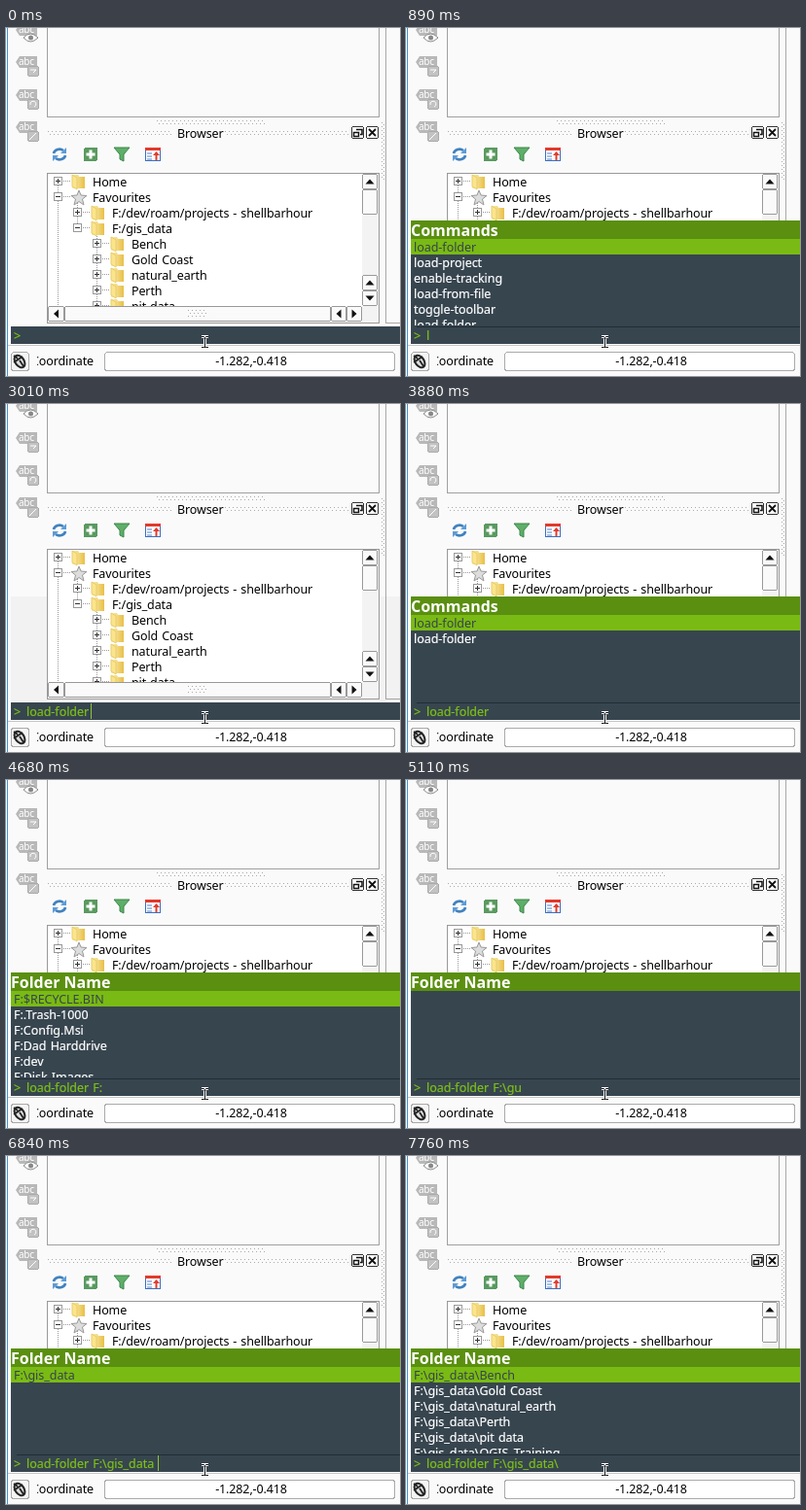
An HTML page for the animation above (8 s loop, 405x358 px).

```html
<!DOCTYPE html>
<html lang="en">
<head>
<meta charset="utf-8">
<title>Command bar</title>
<style>
  html, body { margin: 0; width: 100%; height: 100%; overflow: hidden; background: #fafafa; }
  svg { display: block; width: 405px; height: 358px; }
  text {
    font: 12.5px "Noto Sans", "Open Sans", sans-serif;
    letter-spacing: -.12px; word-spacing: .9px; white-space: pre; fill: #000;
  }
  rect { shape-rendering: crispEdges; }
  .title { font: bold 16px "Noto Sans", "Open Sans", sans-serif; letter-spacing: 0; word-spacing: 0; fill: #fff; }
  .row, .prompt { letter-spacing: -.03px; stroke-width: .2; }
  .row { fill: #fff; stroke: #fff; }
  .row:first-child { fill: #35444e; stroke: none; }
  .prompt { fill: #7dc018; stroke: #7dc018; }
  .tag { font-size: 10px; letter-spacing: -.3px; fill: #fff; }
</style>
</head>
<body>
<svg id="stage" viewBox="0 0 405 358">
  <defs>
    <linearGradient id="gold" x2="1"><stop stop-color="#fdf0b4"/><stop offset="1" stop-color="#e8bf48"/></linearGradient>
    <clipPath id="treeClip"><rect x="43" y="150" width="323" height="136"/></clipPath>
    <clipPath id="listClip"><rect x="5" y="198" width="400" height="108"/></clipPath>
    <clipPath id="labelClip"><rect x="32" y="332" width="66" height="24"/></clipPath>
  </defs>
  <g id="window"></g>
  <rect id="shade" x="5" y="198" width="400" height="109" fill-opacity=".032"/>
  <g id="icons">
    <g fill="none" stroke="#3f82c0" stroke-width="2.6">
      <path d="M49 129a6 5 0 0 1 10-3M61 131a6 5 0 0 1-10 3"/>
    </g>
    <path d="M62 123v6h-6zM48 137v-6h6z" fill="#5b9bd6"/>
    <rect x="80" y="123" width="14" height="14" rx="2" fill="#5a9a60"/>
    <path d="M87 125.500v9M82.500 130h9" stroke="#fff" stroke-width="3"/>
    <path d="M111 123h16l-6 7v7l-4-2v-5z" fill="#5fae6a" stroke="#3a8749"/>
    <rect x="143.5" y="123.5" width="15" height="13" fill="#fff" stroke="#3c6fc0"/>
    <rect x="143" y="123" width="16" height="3" fill="#e23a2c"/>
    <path d="M145 129h5M145 132h5M145 135h5" stroke="#4a80cf"/>
    <path d="M154.500 136v-6" stroke="#e23a2c" stroke-width="2"/>
    <path d="M151 131l3.500-4 3.500 4z" fill="#e23a2c"/>
  </g>
  <g id="tree" clip-path="url(#treeClip)"></g>
  <g id="bars"></g>
  <rect x="5" y="307" width="400" height="18" fill="#37454f"/>
  <g id="popup">
    <rect x="5" y="198" width="400" height="110" fill="#37454f"/>
    <rect x="5" y="198" width="400" height="19" fill="#5a8f10"/>
    <rect id="highlight" x="5" y="217" width="400" height="16" fill="#7aba14"/>
    <rect x="11" y="307" width="394" height="1" fill="#222d34"/>
    <text id="title" class="title" x="5" y="214"></text>
    <g id="list" clip-path="url(#listClip)"></g>
  </g>
  <text class="prompt" x="8" y="321">&gt;</text>
  <text id="typed" class="prompt" x="21" y="321"></text>
  <rect id="caret" y="308" width="1" height="16" fill="#8fc63a"/>
  <g fill="none">
    <path d="M201 317.500h2.500l1 1 1-1h2.500M204.500 318v11M201 328.500h2.500l1-1 1 1h2.500" stroke="#fff" stroke-width="3"/>
    <path d="M201 317.500h2.500l1 1 1-1h2.500M204.500 318v11M201 328.500h2.500l1-1 1 1h2.500" stroke="#111"/>
  </g>
</svg>
<script>
const $ = id => document.getElementById(id);

function add(parent, name, attrs, content = "") {
  const el = document.createElementNS("http://www.w3.org/2000/svg", name);
  for (const key in attrs) el.setAttribute(key, attrs[key]);
  el.textContent = content;
  return parent.appendChild(el);
}
const box = (g, x, y, width, height, fill) => add(g, "rect", { x, y, width, height, fill });
const frame = (g, x, y, w, h, fill, stroke, rx = 0) =>
  add(g, "rect", { x: x + .5, y: y + .5, width: w - 1, height: h - 1, fill, stroke, rx });
const path = (g, d, fill, stroke = "none", width = 1) =>
  add(g, "path", { d, fill, stroke, "stroke-width": width });
const label = (g, x, y, content, attrs = {}) => add(g, "text", { x, y, ...attrs }, content);

function dots(g, x, y, cols, rows) {
  for (let r = 0; r < rows; r++)
    for (let c = 0; c < cols; c++) box(g, x + c * 4 + (r % 2) * 2, y + r * 3, 1, 1, "#aaa");
}

function drawWindow(g) {
  box(g, 0, 0, 405, 358, "#fafafa");
  box(g, 1, 0, 1, 358, "#3d93dc");
  frame(g, 42, -2, 342, 94, "#fafafa", "#a0a0a0");
  frame(g, 390, -2, 20, 306, "#fafafa", "#a8a8a8");
  dots(g, 155, 95, 28, 2);
  dots(g, 43, 106, 32, 2);
  dots(g, 225, 106, 32, 2);
  for (let y = 97; y < 156; y += 4) {
    box(g, 386, y, 1, 1, "#aaa");
    box(g, 388, y + 2, 1, 1, "#aaa");
  }
  label(g, 176, 113, "Browser");
  frame(g, 355, 101, 13, 13, "#fff", "#333", 2);
  path(g, "M360 104.500h6v5h-2M357.500 107.500h5v4h-5z", "none", "#111", 1.5);
  frame(g, 370, 101, 13, 13, "#fff", "#333", 2);
  path(g, "M373 104l7 7M380 104l-7 7", "none", "#111", 1.8);

  const marks = [[25, 8, "h6l-3 3"], [25, 10, "a3 3 0 1 1 4 2"], [24, 13, "l7-7"]];
  [2, 35, 69, 102].forEach((y, i) => {
    path(g, `M10 ${y}l4-6h18v12h-18z`, "#b8b8b8");
    label(g, 13, y + 3, "abc", { class: "tag" });
    if (i === 0) {
      path(g, `M18 ${y + 8}q7-8 15 0q-8 8-15 0z`, "#fff", "#888");
      add(g, "circle", { cx: 25.5, cy: y + 8, r: 2.5, fill: "#888" });
    } else {
      const [mx, my, mark] = marks[i - 1];
      frame(g, 22, y + 4, 12, 11, "#c2c2c2", "#aaa", 2);
      path(g, `M${mx} ${y + my}${mark}`, "none", "#fff");
    }
  });

  box(g, 2, 326, 403, 1, "#c8c8c8");
  frame(g, 5, 333, 19, 20, "#f4f4f4", "#aaa", 3);
  add(g, "ellipse", { cx: 14, cy: 343, rx: 4.5, ry: 7, fill: "#ddd", stroke: "#222", "stroke-width": 2, transform: "rotate(-35 14 343)" });
  path(g, "M8 344l9-6M14 342l4 6M8 337l4 3", "none", "#222", 1.8);
  label(g, 26, 347, "Coordinate", { "clip-path": "url(#labelClip)" });
  frame(g, 101, 333, 299, 20, "#fff", "#aaa", 3);
  label(g, 252, 347, "-1.282,-0.418", { "text-anchor": "middle" });
}

function drawTree(g) {
  box(g, 43, 150, 323, 136, "#fff");
  const line = d => add(g, "path", { d, fill: "none", stroke: "#999", "stroke-dasharray": "1 1" });
  line("M53.500 158v128M73.500 180v26M93.500 212v80");
  const rows = [
    [0, "+", "Home"], [0, "-", "Favourites"],
    [1, "+", "F:/dev/roam/projects - shellbarhour"], [1, "-", "F:/gis_data"],
    [2, "+", "Bench"], [2, "+", "Gold Coast"], [2, "+", "natural_earth"], [2, "+", "Perth"], [2, "+", "pit data"]
  ];
  rows.forEach(([level, sign, name], i) => {
    const x = 53 + level * 20, y = 158 + i * 16, ix = 68 + level * 20;
    line(`M${x + 4} ${y - .5}h10`);
    frame(g, x - 4, y - 5, 9, 9, "#fff", "#999");
    box(g, x - 2, y - 1, 5, 1, "#333");
    if (sign === "+") box(g, x, y - 3, 1, 5, "#333");
    if (name === "Favourites")
      path(g, "M75 167l2 5 6 .5-4.500 3.500 1.500 6-5-3.500-5 3.500 1.500-6-4.500-3.500 6-.5z", "#ddd", "#999");
    else {
      path(g, `M${ix} ${y - 7}h6l1 2h6v12h-13z`, "url(#gold)");
      path(g, `M${ix} ${y - 7}l5 3v12l-5-3z`, "#fbe58c", "#e8cc6c");
    }
    label(g, 89 + level * 20, y + 5, name);
  });
}

function drawBars(g) {
  frame(g, 42, 149, 342, 155, "none", "#999");
  box(g, 366, 150, 17, 136, "#f3f3f3");
  box(g, 43, 286, 340, 17, "#f3f3f3");
  const button = (x, y, w, h, arrow) => {
    frame(g, x, y, w, h, "#fafafa", "#999", 2);
    if (arrow) path(g, `M${x + w / 2 - 4.5} ${y + h / 2 + 2.5}l4.500-5 4.500 5z`, "#111")
      .setAttribute("transform", `rotate(${arrow} ${x + w / 2} ${y + h / 2})`);
  };
  button(366, 150, 16, 16, 360);
  button(366, 166, 16, 26);
  button(366, 254, 16, 16, 360);
  button(366, 270, 16, 16, 180);
  button(43, 286, 17, 16, 270);
  button(60, 286, 274, 16);
  button(334, 286, 16, 16, 270);
  button(350, 286, 16, 16, 90);
  dots(g, 187, 290, 5, 3);
}

const commands = ["load-folder", "load-project", "enable-tracking", "load-from-file", "toggle-toolbar",
  "load-folder", "reload-all-plugins", "reload-init-file"];
const drive = ["$RECYCLE.BIN", ".Trash-1000", "Config.Msi", "Dad Harddrive", "dev", "Disk Images", "gis_data"];
const data = ["Bench", "Gold Coast", "natural_earth", "Perth", "pit data", "QGIS_Training"];

// Letters of the query must occur in the name in order.
function matches(query, name) {
  let at = -1;
  return [...query.toLowerCase()].every(ch => (at = name.toLowerCase().indexOf(ch, at + 1)) >= 0);
}
const filter = (query, names, prefix = "") => names.filter(n => matches(query, n)).map(n => prefix + n);

const closed = (at, typed, caret) => ({ at, typed, caret });
const command = (at, typed) => ({ at, typed, title: "Commands", rows: filter(typed, commands) });
const folder = (at, path, rows, caret) => ({ at, typed: "load-folder " + path, title: "Folder Name", rows, caret });
const onDrive = (at, query) => folder(at, "F:\\" + query, filter(query, drive, "F:\\"));
const blank = (at, typed, caret) => ({ at, typed, title: "", rows: [], caret });

const done = "load-folder F:\\gis_data ";
const steps = [
  closed(0, ""), closed(60, "", 21), closed(590, ""),
  command(890, "l"), command(1040, "lo"), command(1130, "loa"), command(1220, "load"),
  command(2000, "loadf"), command(2110, "loadfo"), command(2200, "loadfol"), command(2350, "loadfold"),
  closed(3010, "load-folder ", 87), closed(3540, "load-folder "),
  command(3880, "load-folder"), blank(4250, "load-folder ", 87),
  blank(4470, "load-folder F", 94), blank(4580, "load-folder F"),
  folder(4680, "F:", drive.map(n => "F:" + n)),
  onDrive(4830, ""), onDrive(5010, "g"), onDrive(5110, "gu"),
  onDrive(5500, "g"), onDrive(5600, ""), onDrive(5710, "g"),
  onDrive(5870, "gi"), onDrive(5990, "gis"), folder(6110, "F:\\gis_", [], 126), onDrive(6230, "gis_"),
  onDrive(6480, "gis_d"), onDrive(6530, "gis_da"), onDrive(6590, "gis_dat"),
  folder(6840, "F:\\gis_data ", ["F:\\gis_data"], 156),
  closed(6900, done, 156), closed(7360, done),
  onDrive(7640, "gis_data"),
  folder(7760, "F:\\gis_data\\", data.map(n => "F:\\gis_data\\" + n))
];
const loop = 8000;

drawWindow($("window"));
drawTree($("tree"));
drawBars($("bars"));
const lines = Array.from({ length: 6 }, (_, i) => label($("list"), 8, 230 + i * 16, "", { class: "row" }));

const show = (el, on) => el.setAttribute("visibility", on ? "inherit" : "hidden");
let current;

function render(step) {
  const open = step.title !== undefined, rows = step.rows || [];
  $("typed").textContent = step.typed;
  $("title").textContent = step.title || "";
  show($("popup"), open);
  show($("highlight"), open && rows.length);
  show($("shade"), !open && step.at > 890);
  lines.forEach((line, i) => line.textContent = rows[i] || "");
  show($("caret"), step.caret);
  if (step.caret) $("caret").setAttribute("x", step.caret);
}

const start = performance.now();
function tick() {
  const time = (performance.now() - start) % loop;
  const step = steps.findLast(s => s.at <= time);
  if (step !== current) render(current = step);
  requestAnimationFrame(tick);
}
tick();
</script>
</body>
</html>
```
